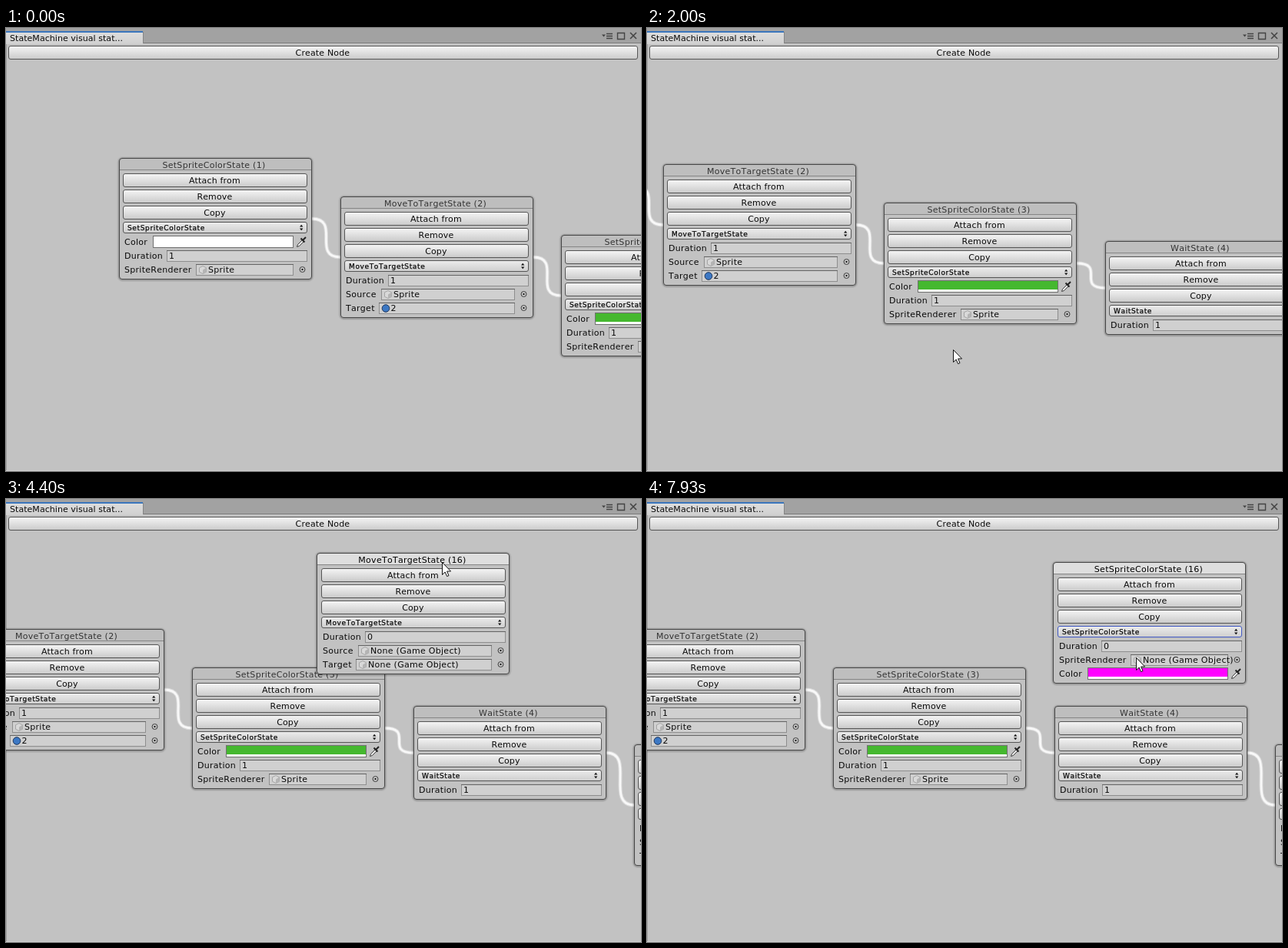
An HTML page that plays this animation: 826x576 px, repeating every 8 s.

```html
<!DOCTYPE html>
<html lang="en">
<head>
<meta charset="utf-8">
<title>State machine editor</title>
<style>
html, body { margin: 0; width: 100%; height: 100%; overflow: hidden; background: #c2c2c2; }
svg { display: block; width: 826px; height: 576px; }
svg svg { width: auto; height: auto; }
text { font: 11px "DejaVu Sans", sans-serif; letter-spacing: .28px; font-kerning: none; fill: #0a0a0a; white-space: pre; }
.mid { text-anchor: middle; }
.button { letter-spacing: .15px; }
.tab { letter-spacing: .05px; }
.small { font-size: 9px; letter-spacing: .64px; stroke: #0a0a0a; stroke-width: .25px; }
.item { font: 11px "Open Sans", "Noto Sans", sans-serif; letter-spacing: .06px; fill: #000; }
.title { fill: #333; }
.on .title { fill: #000; }
.bar { fill: #bebebe; }
.on .bar { fill: #dedede; }
.on .inner { transform: translateX(1px); }
.blue .drop { stroke: #4058c4; }
</style>
</head>
<body>
<svg viewBox="0 0 826 576" id="stage"></svg>
<script>
const STEP = 1000 / 15, LOOP = 8000;
const FIELD_X = { Color: 44, Duration: 62, SpriteRenderer: 100, Source: 53, Target: 50 };

const rect = (x, y, w, h, fill, more = '') =>
  `<rect x="${x}" y="${y}" width="${w}" height="${h}" fill="${fill}" ${more}/>`;
const text = (x, y, s, cls = '') => `<text x="${x}" y="${y}" class="${cls}">${s}</text>`;
const path = (d, fill, more = '') => `<path d="${d}" fill="${fill}" ${more}/>`;
const line = (d, color, width = 1) => path(d, 'none', `stroke="${color}" stroke-width="${width}"`);

function button(x, y, w, label, id = '') {
  return rect(x + .5, y + .5, w - 1, 17, 'url(#btn)', `rx="2.5" stroke="#555" ${id}`) +
    text(x + w / 2 - .6, y + 13, label, 'mid button');
}

function fieldBox(x, y, right) {
  return rect(x + .5, y + .5, right - x - 1, 14, '#d0d0d0', 'stroke="#8e8e8e"') +
    line(`M${x} ${y + .5}H${right}`, '#636363');
}

function colorRow(x, y, color) {
  return rect(x + .5, y - 7.5, 182, 15, '#fff', 'stroke="#707070"') +
    rect(x + 1, y - 7, 181, 11, color) +
    path(`M231.5 ${y + 6.5}l1-3 6-6 2 2-6 6z`, '#e0e0e0', 'stroke="#333" stroke-width=".9"') +
    line(`M236.5 ${y - 4.5}l5 5M239 ${y - 2}l4-4`, '#222', 2);
}

function objectRow(x, y, value) {
  const ball = value === '2', cx = x + 9, cy = y + .5;
  const icon = ball
    ? `<circle cx="${cx}" cy="${cy}" r="4.8" fill="#3c78c4" stroke="#1f3558"/>`
    : path(`M${cx} ${cy - 5}l4.5 2.3v5.4l-4.5 2.3-4.5-2.3v-5.4z`, '#d9d9d9', 'stroke="#999" stroke-width=".8"') +
      path(`M${cx} ${cy}l4.5-2.7v5.4l-4.5 2.3z`, '#b4b4b4');
  return fieldBox(x, y - 7, 227) + icon +
    `<svg x="${x}" y="${y - 8}" style="width:${226 - x}px;height:17px">${text(ball ? 15.5 : 16, 12, value)}</svg>` +
    `<circle cx="238.5" cy="${y}" r="3.5" fill="none" stroke="#333" stroke-width=".9"/><circle cx="238.5" cy="${y}" r="1.1"/>`;
}

function row([label, value], i) {
  const y = 109 + i * 18, x = FIELD_X[label];
  let body;
  if (label === 'Color') body = colorRow(x, y, value);
  else if (label === 'Duration') body = fieldBox(x, y - 7, 245) + text(x + 3, y + 4, value);
  else body = objectRow(x, y, value);
  return text(7, y + 4, label) + body;
}

const nodeHeight = rows => 103 + rows.length * 18;

function node(kind, num, rows) {
  const h = nodeHeight(rows);
  const frame = (w, color) => rect(.5, 1, 250, h, 'none', `rx="4" stroke="${color}" stroke-width="${w}"`);
  return frame(6, 'rgba(0,0,0,.06)') + frame(3.5, 'rgba(0,0,0,.16)') +
    rect(.5, .5, 250, h, '#c2c2c2', 'rx="3.5"') +
    path('M1 16V4q0-3 3-3H247q3 0 3 3V16z', '', 'class="bar"') +
    line('M1 15.5H250', '#858585') +
    rect(.5, .5, 250, h, 'none', 'rx="3.5" stroke="#484848"') +
    '<g class="inner">' + text(123.5, 13, `${kind} (${num})`, 'mid title') +
    ['Attach from', 'Remove', 'Copy'].map((s, i) => button(5, 20 + i * 21, 240, s)).join('') +
    rect(5.5, 83.5, 239, 14, 'url(#drop)', 'rx="2.5" stroke="#555" class="drop"') +
    text(11, 94, kind, 'small') +
    path('M235 89.5l2.2-2.8 2.2 2.8zM235 91.5l2.2 2.8 2.2-2.8z', '#111') +
    rows.map(row).join('') + '</g>';
}

const colorRows = c => [['Color', c], ['Duration', '1'], ['SpriteRenderer', 'Sprite']];
const moveRows = [['Duration', '1'], ['Source', 'Sprite'], ['Target', '2']];
const none = 'None (Game Object)';
const chain = [
  ['SetSpriteColorState', colorRows('#fff')],
  ['MoveToTargetState', moveRows],
  ['SetSpriteColorState', colorRows('#45b82f')],
  ['WaitState', [['Duration', '1']]],
  ['MoveToTargetState', moveRows]
].map(([kind, rows], i) => ({
  kind, rows, num: i + 1,
  x: Math.round(147 + i * 287.5), y: 169 + i * 50,
  middle: 169 + i * 50 + nodeHeight(rows) / 2 + .5
}));

function link(a, b) {
  const x = a.x + 251, bend = 38;
  const d = `M${x} ${a.middle}C${x + bend} ${a.middle} ${b.x - bend} ${b.middle} ${b.x} ${b.middle}`;
  return line(d, 'rgba(255,255,255,.35)', 5) + line(d, '#f8f8f8', 2.8);
}

const graph = chain.slice(1).map((n, i) => link(chain[i], n)).join('') +
  chain.map(n => `<g transform="translate(${n.x} ${n.y})">${node(n.kind, n.num, n.rows)}</g>`).join('');

const menu = rect(503, 187, 190, 70, 'rgba(0,0,0,.2)') + rect(501, 185, 191, 71, 'rgba(0,0,0,.3)') +
  rect(499.5, 182.5, 190, 71, '#f2f2f2', 'stroke="#ccc"') +
  rect(502, 185, 185, 22, '#91c9f7', 'id="hover"') + rect(502, 185, 22, 22, '#91c9f7') +
  line('M508.5 195.5l3.2 3.2 6-6.2', '#123', 1.3) +
  ['MoveToTargetState', 'SetSpriteColorState', 'WaitState'].map((s, i) => text(534, 200 + i * 22, s, 'item')).join('');

const gradient = (id, a, b) =>
  `<linearGradient id="${id}" x2="0" y2="1"><stop stop-color="${a}"/><stop offset="1" stop-color="${b}"/></linearGradient>`;

const header = rect(0, 0, 826, 20, '#a2a2a2') + rect(178, 19, 648, 1, '#7c7c7c') +
  rect(0, 4, 178, 17, 'url(#tab)') + rect(0, 4, 178, 2, '#3a76bd') + rect(178, 5, 1, 15, '#858585') +
  text(5, 17, 'StateMachine visual stat...', 'tab') +
  path('M775 8.5h5l-2.5 3z', '#444') +
  line('M781 7.5h8M781 10.5h8M781 13.5h8', '#444', 1.4) +
  line('M795.5 6.5h9v8h-9zM795 6.5h10', '#444', 1.4) +
  line('M812 6l8 8M820 6l-8 8', '#444', 1.6) +
  button(3, 23, 819, 'Create Node', 'id="create"');

const $ = id => document.getElementById(id);
$('stage').innerHTML =
  '<defs>' + gradient('btn', '#f5f5f5', '#cacaca') + gradient('drop', '#ececec', '#cecece') +
  gradient('down', '#a6a6a6', '#bcbcbc') + gradient('tab', '#dedede', '#d0d0d0') + '</defs>' +
  rect(0, 0, 826, 576, '#c2c2c2') +
  rect(0, 20, 1, 556, '#a0a0a0') + rect(0, 575, 826, 1, '#d0d0d0') +
  `<g id="graph">${graph}</g>` + header + '<g id="fresh"><g id="asMove">' +
  node('MoveToTargetState', 16, [['Duration', '0'], ['Source', none], ['Target', none]]) +
  '</g><g id="asColor" class="blue">' +
  node('SetSpriteColorState', 16, [['Duration', '0'], ['SpriteRenderer', none], ['Color', '#f0f']]) +
  `</g></g><g id="menu">${menu}</g>` +
  `<g id="cursor">${path('M.5 .5V16.5L4.2 13 6.6 18.6 9 17.6 6.6 12H11.6Z', '#fff', 'stroke="#111"')}</g>`;

// Pointer moves: start, end, x, y, and what is dragged along
const moves = [
  [67, 533, 560, 438],
  [600, 733, 545, 434],
  [733, 1200, 469, 428, 'graph'],
  [1467, 1667, 736, 454],
  [1667, 2000, 398, 418, 'graph'],
  [2000, 2133, 332, 410, 'graph'],
  [2133, 2267, 356, 238],
  [2333, 2733, 322, 38],
  [3067, 3533, 165, 71],
  [3600, 3667, 173, 83],
  [3667, 4400, 567, 82, 'fresh'],
  [4400, 4733, 656, 95, 'fresh'],
  [4733, 4933, 644, 141],
  [5133, 5467, 663, 172],
  [6067, 6600, 647, 221],
  [6933, 7133, 628, 214],
  [7400, 7467, 601, 207],
  [7467, 7933, 636, 206, 'fresh']
];

function positions(t) {
  const at = { cursor: [75, 67], graph: [0, 0], fresh: [10, 71] };
  let from = at.cursor;
  for (const [start, end, x, y, held] of moves) {
    const u = Math.min(Math.max((t - start) / (end - start), 0), 1);
    const shift = p => [p[0] + (x - from[0]) * u, p[1] + (y - from[1]) * u];
    at.cursor = shift(at.cursor);
    if (held) at[held] = shift(at[held]);
    from = [x, y];
  }
  return at;
}

const show = (id, on) => $(id).setAttribute('display', on ? 'inline' : 'none');

function draw(time) {
  const t = Math.round(Math.floor((time + 4) / STEP) * STEP);
  const at = positions(t);
  for (const id in at) $(id).setAttribute('transform', `translate(${at[id].map(Math.round).join(' ')})`);
  show('cursor', t >= 67);
  $('create').setAttribute('fill', t >= 3000 && t < 3067 ? 'url(#down)' : 'url(#btn)');

  show('fresh', t >= 3067);
  $('fresh').setAttribute('class', t >= 3667 ? 'on' : '');
  show('asMove', t < 6933);
  show('asColor', t >= 6933);

  show('menu', t >= 6067 && t < 6867);
  const item = Math.floor((at.cursor[1] - 185) / 22);
  show('hover', item >= 0);
  $('hover').setAttribute('y', 185 + Math.max(item, 0) * 22);
}

const start = performance.now();
function tick() {
  draw((performance.now() - start) % LOOP);
  requestAnimationFrame(tick);
}
tick();
</script>
</body>
</html>
```
